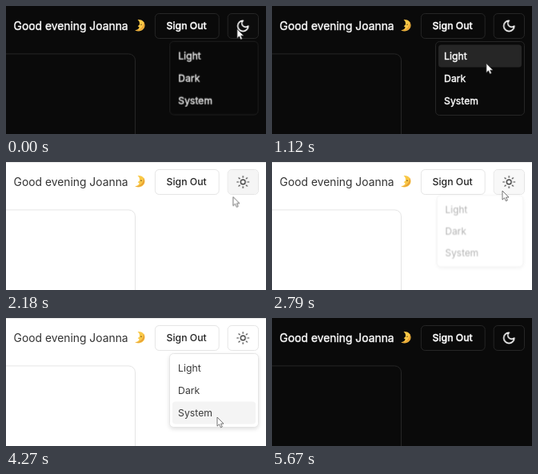
Animation, 325 px wide and 160 px high, one loop 5.79 s. Source, as an HTML page:

```html
<!DOCTYPE html>
<html lang="en">
<head>
<meta charset="utf-8">
<title>Theme menu</title>
<style>
  html, body { margin: 0; width: 100%; height: 100%; overflow: hidden; }

  svg {
    display: block; width: 100vw; height: 100vh;
    background: var(--bg);
    font-family: Inter, "Liberation Sans", sans-serif;
    animation: theme 5790ms step-end infinite;
  }
  @keyframes theme {
    0%, 78.58% {
      --bg: #0a0a0a; --edge: #0a0a0a; --line: #262626; --accent: #262626;
      --text: #fafafa; --soft: #fafafa; --item: #fafafa; --weight: .4px;
      --shadow: #0000; --sun: 0; --moon: 1;
    }
    28.84% {
      --bg: #fff; --edge: #e8e8e8; --line: #e5e5e5; --accent: #f4f4f4;
      --text: #222; --soft: #333; --item: #3a3a3a; --weight: 0px;
      --shadow: #0000001f; --sun: 1; --moon: 0;
    }
  }

  text { fill: var(--c); stroke: var(--c); stroke-width: var(--weight); }
  .greeting { --c: var(--soft); font-size: 13.85px; }
  .sign { --c: var(--text); font-size: 12.25px; font-weight: 500; }
  .item { --c: var(--item); font-size: 12.25px; }

  .box { fill: var(--bg); stroke: var(--line); }
  .panel { filter: drop-shadow(0 2px 2.5px var(--shadow)); }
  .fill { fill: var(--accent); }
  .icon { fill: none; stroke: var(--text); stroke-linecap: round; stroke-linejoin: round; }
  .moon { opacity: var(--moon); stroke-width: 2.3; }
  .sun { opacity: var(--sun); stroke-width: 1.6; }

  .menu, .fill, .cursor { animation: 5790ms ease infinite; }
  .menu { animation-name: menu; transform-origin: 260px 90.5px; }
  .hover { animation-name: hover; }
  .light { animation-name: light; }
  .dark { animation-name: dark; }
  .system { animation-name: system; }
  .cursor { animation-name: cursor; animation-timing-function: ease-in-out; }

  @keyframes menu {
    0% { opacity: .92; transform: translateY(-.6px) scale(.996); }
    1.04% { opacity: 1; transform: none; }
    28.84% { opacity: 1; transform: none; animation-timing-function: linear; }
    30.39% { opacity: 0; transform: scale(.95); }
    30.4%, 47.58% { opacity: 0; transform: translateY(-7px) scale(.95); }
    50.17%, 78.58% { opacity: 1; transform: none; }
    81.17%, 100% { opacity: 0; transform: scale(.95); }
  }
  @keyframes hover {
    0% { opacity: .08; }
    1.04%, 36.3% { opacity: 0; }
    38.9%, 47.58% { opacity: 1; }
    50.17%, 86.2% { opacity: 0; }
    88.4%, 97.9% { opacity: 1; }
    97.92%, 100% { opacity: 0; }
  }
  @keyframes light {
    0%, 6% { opacity: 0; }
    8.6%, 11% { opacity: 1; }
    13.6%, 16.4% { opacity: 0; }
    19%, 30.4% { opacity: 1; }
    30.41%, 55.7% { opacity: 0; }
    57% { opacity: .7; }
    59.2%, 100% { opacity: 0; }
  }
  @keyframes dark {
    0%, 11% { opacity: 0; }
    13.6%, 16.4% { opacity: 1; }
    19%, 56.9% { opacity: 0; }
    58.2% { opacity: .85; }
    60.8%, 100% { opacity: 0; }
  }
  @keyframes system {
    0%, 58.2% { opacity: 0; }
    60.8%, 81.2% { opacity: 1; }
    81.21%, 100% { opacity: 0; }
  }
  @keyframes cursor {
    0%, 2% { transform: translate(289px, 29px); }
    7% { transform: translate(274px, 60px); animation-timing-function: linear; }
    10% { transform: translate(268px, 74px); animation-timing-function: ease-out; }
    13%, 15.2% { transform: translate(266px, 93px); }
    18.8%, 30.9% { transform: translate(268px, 72px); }
    40.8%, 54.9% { transform: translate(288px, 36px); animation-timing-function: ease-in; }
    57% { transform: translate(278px, 72px); animation-timing-function: linear; }
    58.2% { transform: translate(268px, 104px); animation-timing-function: ease-out; }
    59.06%, 78.57% { transform: translate(264px, 124px); }
    78.58%, 79.5% { transform: translate(262px, 128px); }
    88%, 97.9% { transform: translate(289px, 29px); opacity: 1; }
    97.92%, 100% { transform: translate(289px, 29px); opacity: 0; }
  }
</style>
</head>
<body>
<svg viewBox="0 0 325 160">
  <rect width="325" height="1" fill="var(--edge)"/>
  <rect class="box" x="-20" y="59.9" width="181.5" height="120" rx="8"/>

  <text class="greeting" x="9.6" y="29.5">Good evening Joanna</text>
  <g>
    <path d="M164.5 17C170 16.4 173.8 20 173.5 24.6C173.2 29.6 168 33.2 161.2 30.5C164.6 30 166.3 28.4 166.6 26.6L164.7 25.2L166.8 23.6C167.3 21 166.8 19 164.5 17Z" fill="#f9c846"/>
    <path d="M172.2 19.8C175 25 171.5 32.8 161.2 30.5C167.5 30.8 172.2 26.5 172.2 19.8Z" fill="#e9a035"/>
    <circle cx="169" cy="23.2" r=".8" fill="#6b4a1c"/>
  </g>

  <rect class="box" x="186.4" y="9.5" width="79.8" height="31" rx="5"/>
  <text class="sign" x="200.6" y="29.4">Sign Out</text>

  <rect class="box" x="277.2" y="9.5" width="38.3" height="31" rx="5"/>
  <rect class="fill hover" x="277.7" y="10" width="37.3" height="30" rx="4.5"/>
  <g class="icon" transform="translate(287.5 16.2) scale(.73)">
    <path class="moon" d="M12 3a6 6 0 0 0 9 9 9 9 0 1 1-9-9Z"/>
    <g class="sun">
      <circle cx="12" cy="12" r="4"/>
      <path d="M12 2v2M12 20v2M4.93 4.93l1.41 1.41M17.66 17.66l1.41 1.41M2 12h2M20 12h2M6.34 17.66l-1.41 1.41M19.07 4.93l-1.41 1.41"/>
    </g>
  </g>

  <g class="menu">
    <rect class="box panel" x="204.5" y="44.5" width="111" height="92" rx="5"/>
    <rect class="fill light" x="208" y="48.5" width="104" height="28" rx="3.5"/>
    <rect class="fill dark" x="208" y="76.5" width="104" height="28" rx="3.5"/>
    <rect class="fill system" x="208" y="104.5" width="104" height="28" rx="3.5"/>
    <text class="item" x="215.1" y="67.2">Light</text>
    <text class="item" x="215.1" y="95.2">Dark</text>
    <text class="item" x="215.1" y="123.2">System</text>
  </g>

  <path class="cursor" d="M0 0V11.2L2.6 8.8L4.4 12.8L6.3 12L4.6 8.1H8Z" fill="#fff" stroke="#555" stroke-width=".8" stroke-linejoin="round"/>
</svg>
</body>
</html>
```
